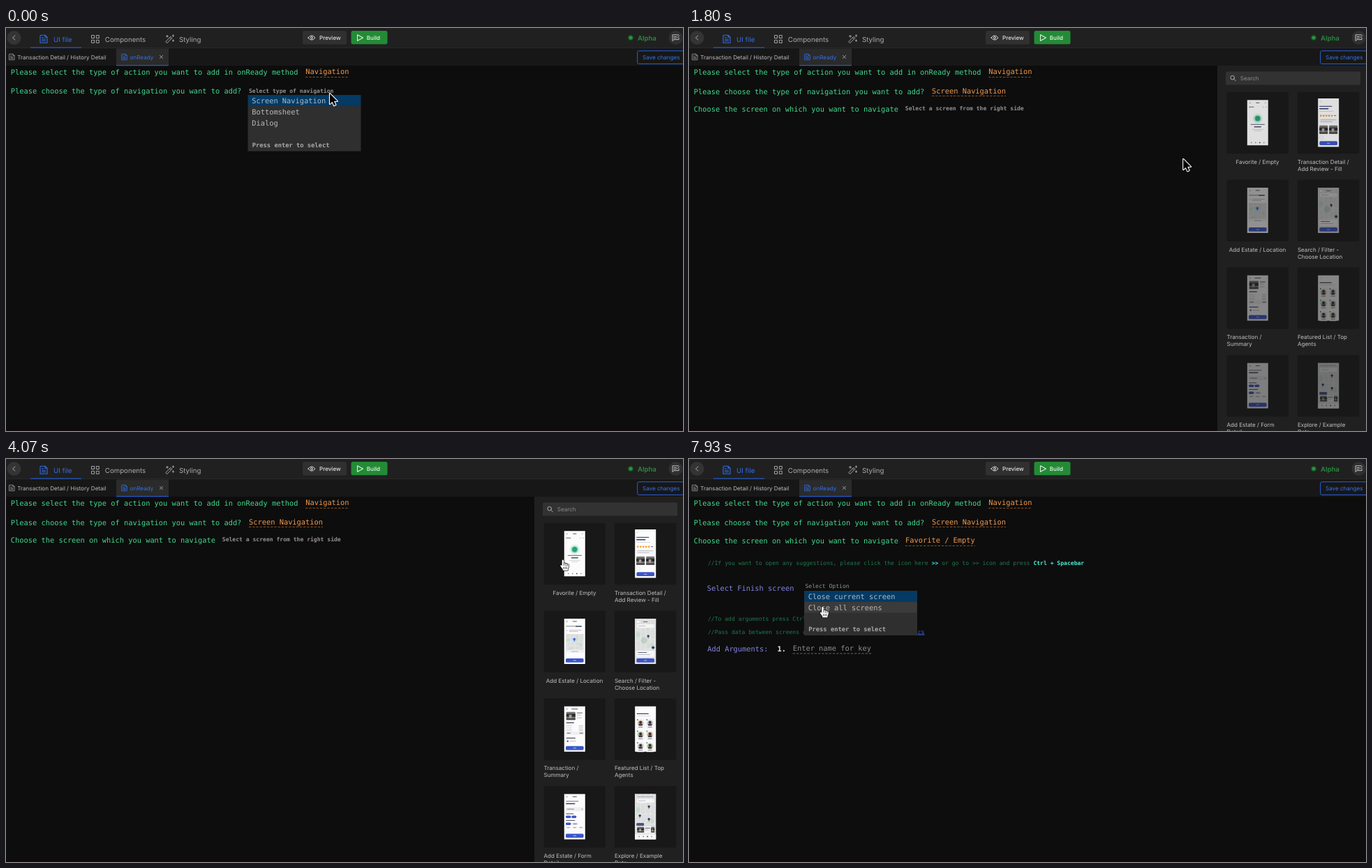
Animation, 970 px wide and 578 px high, one loop 8 s. Source, as an HTML page with a canvas:

```html
<!DOCTYPE html>
<html lang="en">
<head>
<meta charset="utf-8">
<title>Navigation action builder</title>
<style>
  html, body { margin: 0; width: 100%; height: 100%; overflow: hidden; background: #0d0d0d; }
  canvas { display: block; width: 970px; height: 578px; }
</style>
</head>
<body>
<canvas id="stage" width="970" height="578"></canvas>
<script>
const ctx = document.getElementById('stage').getContext('2d');
const LOOP = 8000;
const MONO = '"DejaVu Sans Mono", monospace';
const SANS = 'Inter, sans-serif';
const BIG = 10.36, SMALL = 8.07;
const GREEN = '#42d88e', ORANGE = '#f0994f', PURPLE = '#8482e0', COMMENT = '#1f7850',
      CYAN = '#4debd3', BLUE = '#2f6fec', GREY = '#929292', BUTTON = '#3b55c9', TILE = '#181818';

// Moments of the interaction
const PICK_NAVIGATION = 1000, PICK_SCREEN = 4330, OPEN_FINISH = 6070;

const clamp = v => Math.max(0, Math.min(1, v));

function rect(x, y, w, h, color, radius = 0) {
  ctx.fillStyle = color;
  ctx.beginPath();
  ctx.roundRect(x, y, w, h, radius);
  ctx.fill();
}
function box(x, y, w, h, color, radius = 0, width = 1) {
  ctx.strokeStyle = color;
  ctx.lineWidth = width;
  ctx.beginPath();
  ctx.roundRect(x, y, w, h, radius);
  ctx.stroke();
}
function disc(x, y, r, color) {
  ctx.fillStyle = color;
  ctx.beginPath();
  ctx.arc(x, y, r, 0, Math.PI * 2);
  ctx.fill();
}
function stroke(d, x, y, color, width = 1) {
  ctx.save();
  ctx.translate(x, y);
  ctx.strokeStyle = color;
  ctx.lineWidth = width;
  ctx.lineCap = ctx.lineJoin = 'round';
  ctx.stroke(new Path2D(d));
  ctx.restore();
}
// Text is placed by the middle of its capitals
function text(str, x, midY, color, size, family, weight = 400, align = 'left') {
  ctx.font = `${weight} ${size}px ${family}`;
  ctx.textAlign = align;
  ctx.fillStyle = color;
  ctx.fillText(str, x, midY + size * 0.364);
}
const code = (str, x, y, color, size = BIG, weight = 400) => text(str, x, y, color, size, MONO, weight);
const ui = (str, x, y, color, size = SMALL, weight = 400, align) => text(str, x, y, color, size, SANS, weight, align);

function dashes(x1, x2, y, color) {
  ctx.strokeStyle = color;
  ctx.lineWidth = 1;
  ctx.setLineDash([3.2, 2]);
  ctx.beginPath();
  ctx.moveTo(x1, y);
  ctx.lineTo(x2, y);
  ctx.stroke();
  ctx.setLineDash([]);
}
function answer(str, x, y, endX, lineY) {
  code(str, x, y, ORANGE);
  dashes(x, endX, lineY, '#85512a');
}

function docIcon(x, y, scale, color) {
  ctx.save();
  ctx.translate(x, y);
  ctx.scale(scale, scale);
  stroke('M1 0H7L10 3V11H0V1ZM7 0V3H10M2.5 3.5H4.5M2.5 6H7.5M2.5 8.3H7.5', 0, 0, color, 1.1);
  ctx.restore();
}

function drawHeader() {
  rect(0, 0, 970, 28, '#202020');
  rect(0, 28, 970, 26, '#171717');
  rect(0, 28, 970, 1, '#292929');
  rect(35, 27.5, 73, 1.3, '#2458c4');

  disc(11.5, 14, 10, '#343434');
  stroke('M2 -3L-1.5 0L2 3', 11, 14, '#a8a8a8');
  docIcon(49, 10.2, 1, BLUE);
  ui('UI file', 68, 16, BLUE, 9.7);
  for (const dx of [0, 6.8]) for (const dy of [0, 6.8]) box(122.5 + dx, 10.5 + dy, 4, 4, '#a5a5a5');
  ui('Components', 141.8, 16, '#acacac', 9.7);
  stroke('M0 9L7 2L9 4L2 11ZM5.5 3.5L7.5 5.5M2 0V3M.5 1.5H3.5M10.5 -.5V2M9.3 .8H11.7M10.5 6.5V9M9.3 7.8H11.7', 229, 10.3, '#a5a5a5');
  ui('Styling', 248, 16, '#acacac', 9.7);

  rect(425, 4, 63, 19.5, '#303030', 2.5);
  stroke('M-5 0Q0 -6.4 5 0Q0 6.4 -5 0ZM1.5 0A1.5 1.5 0 1 1 -1.5 0A1.5 1.5 0 1 1 1.5 0', 438, 14, '#dadada');
  ui('Preview', 449, 14, '#e4e4e4', SMALL, 500);
  rect(494.5, 4, 52, 19.3, '#238b35', 2.5);
  stroke('M-3.5 -4.3L4.5 0L-3.5 4.3Z', 507, 14, '#e0efe2', 1.1);
  ui('Build', 516.8, 14, '#eef6ef', SMALL, 500);

  disc(895, 14, 4.6, '#183b20');
  disc(895, 14, 2.8, '#2a9140');
  ui('Alpha', 905, 14.5, '#2b8a3e', 9.6, 600);
  disc(959.5, 14, 10, '#303030');
  stroke('M4 -4.2H-4.5V4.5L-2.5 2.6H4.5V0M-2.5 -1.5H1M-2.5 .7H0M1.5 .5L5.2 -3.2', 959.5, 14, '#c2c2c2');

  docIcon(4.5, 37.3, 0.76, '#9c9c9c');
  ui('Transaction Detail / History Detail', 16.3, 42, '#bcbcbc');
  rect(158, 29.5, 75, 24.5, '#2b2b2b');
  rect(158, 53, 75, 1.2, '#2458c4');
  docIcon(165.7, 37.3, 0.76, BLUE);
  ui('onReady', 177.7, 42, BLUE);
  stroke('M-2 -2L2 2M2 -2L-2 2', 222.5, 41.5, '#b4b4b4', 0.9);
  box(904.7, 32.8, 76, 18.6, '#2a60d8', 2);
  ui('Save changes', 912, 42.3, '#3474ec');
}

// ---- Screen previews, each in a 30 x 65 box ----
const bar = (x, y, w, color = '#b9b9bd', h = 0.9) => rect(x, y, w, h, color);
const button = y => { rect(2.2, y, 25.6, 5.8, BUTTON, 1.6); bar(13, y + 2.5, 4, '#c5cdf4'); };
function topBar(title = 5) {
  disc(4, 4, 1.6, '#f0f0f2');
  bar(3.4, 3.6, 1.2, '#777');
  bar(15 - title / 2, 3.5, title, '#47485a');
}
function map(y, h, x = 0, w = 30) {
  ctx.save();
  ctx.beginPath();
  ctx.rect(x, y, w, h);
  ctx.clip();
  rect(x, y, w, h, '#dcdddd');
  for (const [px, py, r] of [[0.15, 0.35, 3.6], [0.62, 0.2, 3], [0.78, 0.6, 4], [0.3, 0.8, 3]])
    disc(x + px * w, y + py * h, r * w / 32, '#c5dcca');
  for (let i = 0; i < 5; i++)
    stroke(`M0 ${i * h / 4}Q${w / 2} ${i * h / 4 - 7} ${w} ${i * h / 5 + 4}M${i * w / 4} 0L${i * w / 5 + 3} ${h}`, x, y, '#eaeaea', 0.8);
  ctx.restore();
}
function pin(x, y, color = '#353d6e') {
  disc(x, y, 1.7, color);
  stroke('M0 0V3', x, y, color, 0.8);
}
function photo(x, y, w, h) {
  rect(x, y, w, h, '#76736f', 1);
  rect(x, y + h * 0.25, w, h * 0.35, '#282a2e');
  rect(x + w * 0.3, y + h * 0.35, w * 0.3, h * 0.45, '#aaa298');
  rect(x, y + h * 0.8, w, h * 0.2, '#484644');
}
function navDots(y) {
  for (let i = 0; i < 4; i++) disc(6 + i * 6, y, 0.9, i === 2 ? '#343d6b' : '#8f9096');
}

const screens = [
  { label: ['Favorite / Empty'], draw() {
    topBar();
    disc(26, 4, 1.4, '#ddd');
    bar(2.5, 9.5, 7, '#55566a');
    bar(22, 9.5, 2); bar(26, 9.5, 2);
    disc(15, 26.5, 7.2, '#e0f4eb');
    disc(15, 26.5, 5.4, '#a6e0c8');
    disc(15, 26.5, 3.7, '#28a277');
    bar(5, 34.5, 20, '#6b6d80', 1.1); bar(10, 37.8, 10, '#30354f', 1.3);
    bar(7, 42, 16, '#c9c9cd', 0.7); bar(10, 44, 10, '#c9c9cd', 0.7);
    navDots(61);
  } },
  { label: ['Transaction Detail /', 'Add Review - Fill'], tall: true, draw() {
    disc(4, 2, 1.6, '#eee');
    bar(2, 8.5, 18, '#42506f', 1.2); bar(2, 11.7, 13, '#2b3c78', 1.5);
    bar(2, 16, 20, '#c9c9cd', 0.7);
    for (let i = 0; i < 5; i++) disc(4 + i * 4, 22.5, 1.4, '#f0a23c');
    bar(23, 22, 3, '#555');
    rect(2, 26.5, 26, 7, '#f4f4f7', 1);
    bar(3.5, 28, 22); bar(3.5, 30.5, 17);
    photo(2, 36.5, 12, 12); photo(16, 36.5, 12, 12);
    box(2.5, 51.5, 4.5, 4.5, '#d4d4d8', 1, 0.5);
    button(59);
  } },
  { label: ['Add Estate / Location'], draw() {
    topBar(6);
    bar(2.5, 10.3, 13, '#8b8d98', 1.1); bar(16, 10.3, 9, '#2b3357', 1.4);
    disc(4, 17, 1.5, '#e5e5ea'); bar(7, 16, 18); bar(7, 18, 13);
    map(22, 26, 2, 26);
    disc(14.5, 30, 3.4, '#c4d4f4'); pin(14.5, 29.5, '#356acc');
    rect(2, 45, 26, 4, '#f2f2f4'); bar(10, 46.6, 10, '#a5a5ae');
    button(57);
  } },
  { label: ['Search / Filter -', 'Choose Location'], draw() {
    map(0, 65);
    disc(4.5, 4.5, 1.8, '#fff'); bar(12, 4, 6, '#555');
    rect(2.5, 8, 25, 5, '#f4f4f5', 1); bar(5, 10, 10);
    pin(19, 25, '#39415c');
    disc(13, 31, 4.6, 'rgba(150,190,160,.45)');
    disc(26, 41.5, 2.1, '#343e68');
    rect(2, 46, 26, 9, '#f5f5f6', 1.5);
    bar(4, 48, 13, '#555a6c'); bar(4, 51, 18);
    button(57);
  } },
  { label: ['Transaction /', 'Summary'], draw() {
    topBar(9);
    photo(3, 8, 13, 11.5);
    bar(18, 9, 8, '#474a5e'); bar(18, 12, 6); bar(18, 16, 7);
    bar(3, 23, 11, '#30344c', 1.2);
    for (let i = 0; i < 4; i++) { bar(3, 27.5 + i * 2.4, 8, '#c6c6cc', 0.7); bar(21, 27.5 + i * 2.4, 6, '#aaa', 0.7); }
    rect(2, 36, 26, 5, '#efeff2'); bar(4, 38, 5, '#444'); bar(22, 38, 5, '#444');
    bar(3, 45, 13, '#30344c', 1.1);
    disc(5, 50, 1.2, '#565b68'); bar(8, 49.6, 9);
    button(57);
  } },
  { label: ['Featured List / Top', 'Agents'], draw() {
    disc(4, 4, 1.6, '#eee');
    bar(2.5, 10, 17, '#454b66', 1.3);
    bar(2.5, 13.5, 20, '#c6c6cc', 0.7);
    for (let i = 0; i < 6; i++) {
      const x = 8 + (i % 2) * 13.5, y = 24 + Math.floor(i / 2) * 16.5;
      rect(x - 5.8, y - 6.5, 11.8, 15, '#f4f4f6', 1.5);
      disc(x, y, 4.3, ['#d6b9a3', '#c3c4c8', '#b8bf9d'][i % 3]);
      disc(x, y - 1, 2, '#35302e');
      rect(x - 2.8, y + 1, 5.6, 2.7, '#454044', 1.2);
      disc(x - 4.3, y - 4.8, 1, '#3b9b70');
      bar(x - 3, y + 5.5, 6, '#74757f');
    }
  } },
  { label: ['Add Estate / Form', 'Detail'], draw() {
    topBar(6);
    bar(2.5, 10, 18, '#777b8c', 1.1); bar(2.5, 13.3, 13, '#293357', 1.4);
    rect(2, 19, 26, 5.5, '#eeeef2', 1.3); bar(4, 21.3, 10, '#777'); bar(25, 21.3, 1.5, '#777');
    bar(2.5, 28, 11, '#454b5c', 1);
    rect(2.2, 31, 7.5, 3.5, BUTTON, 1.6); rect(10.5, 31, 7, 3.5, BUTTON, 1.6);
    bar(2.5, 37.5, 13, '#454b5c', 1);
    rect(2.2, 41, 7.5, 3.5, BUTTON, 1.6);
    rect(11, 41, 9, 3.5, '#e2e2e8', 1.6); bar(13, 42.4, 5, '#666');
    for (let i = 0; i < 3; i++) { rect(2.2 + i * 9, 46.5, 7.5, 3.3, '#ededf1', 1.5); bar(4.2 + i * 9, 47.8, 3.5, '#999'); }
    button(57);
  } },
  { label: ['Explore / Example', 'Data'], draw() {
    map(0, 65);
    bar(4, 3.5, 22, '#a7aab5', 1);
    rect(2.5, 7, 25, 5.5, '#f4f4f5', 1.2); bar(5, 9.3, 10);
    pin(20, 18); pin(7, 31); pin(20, 36);
    rect(2, 41.5, 11, 4, '#4a5488', 1.5);
    rect(2, 46.5, 26, 10, '#f3f3f4', 1.2);
    photo(3, 47.2, 10, 8); photo(23, 47.2, 5, 8);
    bar(14.5, 48.5, 7, '#4c5065'); bar(14.5, 51, 5);
    rect(0, 58, 30, 7, '#f7f7f8'); navDots(61);
  } },
];

// The preview is drawn whole, then veiled, so that layers fade together
function drawPreview(screen, x, y, shown) {
  if (shown === 0) return;
  const top = screen.tall ? -2.2 : 0, height = screen.tall ? 69.5 : 65;
  ctx.save();
  ctx.translate(x, y);
  rect(0, top, 30, height, '#fcfcfd');
  screen.draw();
  ctx.globalAlpha = 1 - shown;
  rect(-1, top - 1, 32, height + 2, TILE);
  ctx.restore();
}

function drawPanel(t) {
  rect(757, 54, 213, 524, '#202020');
  rect(769, 62.5, 193, 19, '#323232', 1.5);
  stroke('M2.8 0A2.8 2.8 0 1 1 -2.8 0A2.8 2.8 0 1 1 2.8 0M2 2L4.5 4.5', 778.7, 71.2, '#b0b0b0');
  ui('Search', 789.8, 72, '#8a8a8a');

  screens.forEach((screen, i) => {
    const row = Math.floor(i / 2);
    const x = 770.5 + (i % 2) * 101.4, y = 91.8 + row * 125.7;
    rect(x, y, 88.5, 88.5, TILE, 2);
    drawPreview(screen, x + 29.3, y + 11.5, clamp((t - (row ? 1630 + row * 12 : 1540)) / 300));
    if (screen.label.length === 1) ui(screen.label[0], x + 44, y + 100.3, '#c0c0c0', SMALL, 400, 'center');
    else screen.label.forEach((line, n) => ui(line, x, y + 100.3 + n * 9.8, '#c0c0c0'));
  });
}

function drawMenu(x, y, height, items, hovered) {
  rect(x, y, 162, height, '#2f2f2f');
  rect(x + 0.5, y + 0.5, 161, 15.3, '#043a63');
  if (hovered) rect(x + 0.5, y + 16 * hovered, 161, 15.5, '#3b3b3b');
  items.forEach((item, i) => code(item, x + 5.7, y + 8.2 + i * 16.1, i ? '#b9b9b9' : '#a9bdcd'));
  code('Press enter to select', x + 6.3, y + height - 9, '#ababab', 8.76, 700);
}

function drawArguments(t, pointer) {
  const row = 149;
  const at = n => 27 + n * SMALL * 0.602;
  code('//If you want to open any suggestions, please click the icon here', at(0), row, COMMENT, SMALL);
  code('>>', at(66), row, CYAN, SMALL, 700);
  code('or go to >> icon and press', at(69), row, COMMENT, SMALL);
  code('Ctrl + Spacebar', at(96), row, CYAN, SMALL, 700);

  code('Select Finish screen', 25.7, 185, PURPLE);
  code('//To add arguments press Ctrl + Enter', 27, 229.3, COMMENT, SMALL);
  code('//Pass data between screens using navigation arguments.', 27, 248, COMMENT, SMALL);
  code('Read docs', 293.7, 248, '#3a67d8', SMALL);
  rect(293.7, 251.6, 44, 0.9, '#3a67d8');
  code('Add Arguments:', 26.2, 272.7, PURPLE);
  code('1.', 126.5, 272.7, '#ededed', BIG, 700);
  code('Enter name for key', 148.7, 271, '#8c8c8c');
  dashes(148.7, 263, 279, '#666');

  if (t < OPEN_FINISH) {
    rect(156.7, 178.3, 12.3, 12.7, '#45453d');
    stroke('M-3.8 -3.5L-.4 0L-3.8 3.5M.4 -3.5L3.8 0L.4 3.5', 162.8, 184.7, '#8d8f72');
  } else {
    code('Select Option', 166.5, 182, GREY, SMALL);
    drawMenu(165, 189, 64, ['Close current screen', 'Close all screens'], pointer.y > 205 ? 1 : 0);
  }
}

function drawEditor(t, pointer) {
  rect(0, 54, 970, 524, '#0d0d0d');
  rect(0, 575, 970, 3, '#12090e');
  code('Please select the type of action you want to add in onReady method', 6.8, 63.7, GREEN);
  answer('Navigation', 429.2, 62.5, 491, 70.5);

  const question = 'Please choose the type of navigation you want to add?';
  if (t < PICK_NAVIGATION) {
    code(question, 6.8, 90.2, GREEN);
    code('Select type of navigation', 348, 89.7, GREY, SMALL, 700);
    drawMenu(346.5, 96, 80.7, ['Screen Navigation', 'Bottomsheet', 'Dialog'], 0);
    return;
  }
  code(question, 6.8, 91.7, GREEN);
  answer('Screen Navigation', 348, 90.4, 454, 97.5);
  const chosen = t >= PICK_SCREEN;
  code('Choose the screen on which you want to navigate', 6.8, chosen ? 117.7 : 116, GREEN);
  if (chosen) {
    answer('Favorite / Empty', 310, 116.3, 410, 124.5);
    drawArguments(t, pointer);
  } else {
    code('Select a screen from the right side', 309.8, 115.5, GREY, SMALL, 700);
    drawPanel(t);
  }
}

// ---- Mouse pointer: time, x, y ----
const path = [
  [0, 464, 94], [270, 464, 94], [470, 440, 100], [650, 428, 104.2], [1400, 428, 104.2],
  [1600, 560, 150], [1800, 707.8, 188], [2100, 780, 200], [2500, 808, 196], [2800, 809, 191],
  [3070, 807, 189.5], [3330, 802, 146], [3670, 802, 146], [3800, 798, 144.5], [4330, 798, 144.5],
  [4630, 570, 140], [4930, 334, 155], [5130, 248, 176], [5400, 166, 185.5], [6200, 166, 185.5],
  [6500, 180, 205], [6900, 186, 213], [7200, 188, 215], [7600, 188, 215], [7930, 191.5, 212],
  [8000, 191.5, 212],
];
function speed(i, axis) {
  const a = path[i - 1], b = path[i], c = path[i + 1];
  if (!a || !c || a[axis] === b[axis] || b[axis] === c[axis]) return 0;
  return (c[axis] - a[axis]) / (c[0] - a[0]);
}
function pointerAt(t) {
  const i = path.findIndex(p => p[0] > t) - 1;
  const a = path[i], b = path[i + 1], span = b[0] - a[0], u = (t - a[0]) / span;
  const along = axis => {
    const h = u * u * (3 - 2 * u);
    return a[axis] + (b[axis] - a[axis]) * h
      + span * u * (1 - u) * ((1 - u) * speed(i, axis) - u * speed(i + 1, axis));
  };
  return { x: along(1), y: along(2) };
}
function overClickable(t, { x, y }) {
  if (t < PICK_NAVIGATION) return y > 97;
  if (t < PICK_SCREEN) return x > 770;
  if (t < OPEN_FINISH) return x < 170 && y > 178;
  return y > 189;
}

const arrow = new Path2D('M0 0V15L3.5 11.8L6 17.3L8.4 16.2L6 10.9H10.8Z');
const hand = new Path2D('M-1.3 1.2Q-1.2 0 0 0Q1.2 0 1.3 1.2V5Q3.2 4.2 3.9 5.6Q5.6 5 6.3 6.4Q8.4 6 8.4 8.2Q8.4 11 7 13V15.3H-.3V13.4Q-2.3 11.2 -3.6 9Q-4 7.6 -2.7 7.4L-1.3 8.6Z');
function drawPointer(t, pointer) {
  const pointing = overClickable(t, pointer);
  const shape = pointing ? hand : arrow;
  ctx.save();
  ctx.translate(pointer.x, pointer.y);
  ctx.lineJoin = 'round';
  ctx.lineWidth = pointing ? 1.2 : 2.2;
  ctx.strokeStyle = pointing ? '#000' : '#fff';
  ctx.stroke(shape);
  ctx.fillStyle = pointing ? '#fff' : '#000';
  ctx.fill(shape);
  if (pointing) stroke('M1.4 5V8M3.9 6V8.4M6.3 6.8V8.8M1 10.5V13M3.2 10.5V13M5.3 10.5V13', 0, 0, '#222', 0.8);
  ctx.restore();
}

function frame() {
  const t = performance.now() % LOOP;
  const pointer = pointerAt(t);
  ctx.textRendering = 'geometricPrecision';
  drawEditor(t, pointer);
  drawHeader();
  drawPointer(t, pointer);
  requestAnimationFrame(frame);
}
frame();
</script>
</body>
</html>
```
